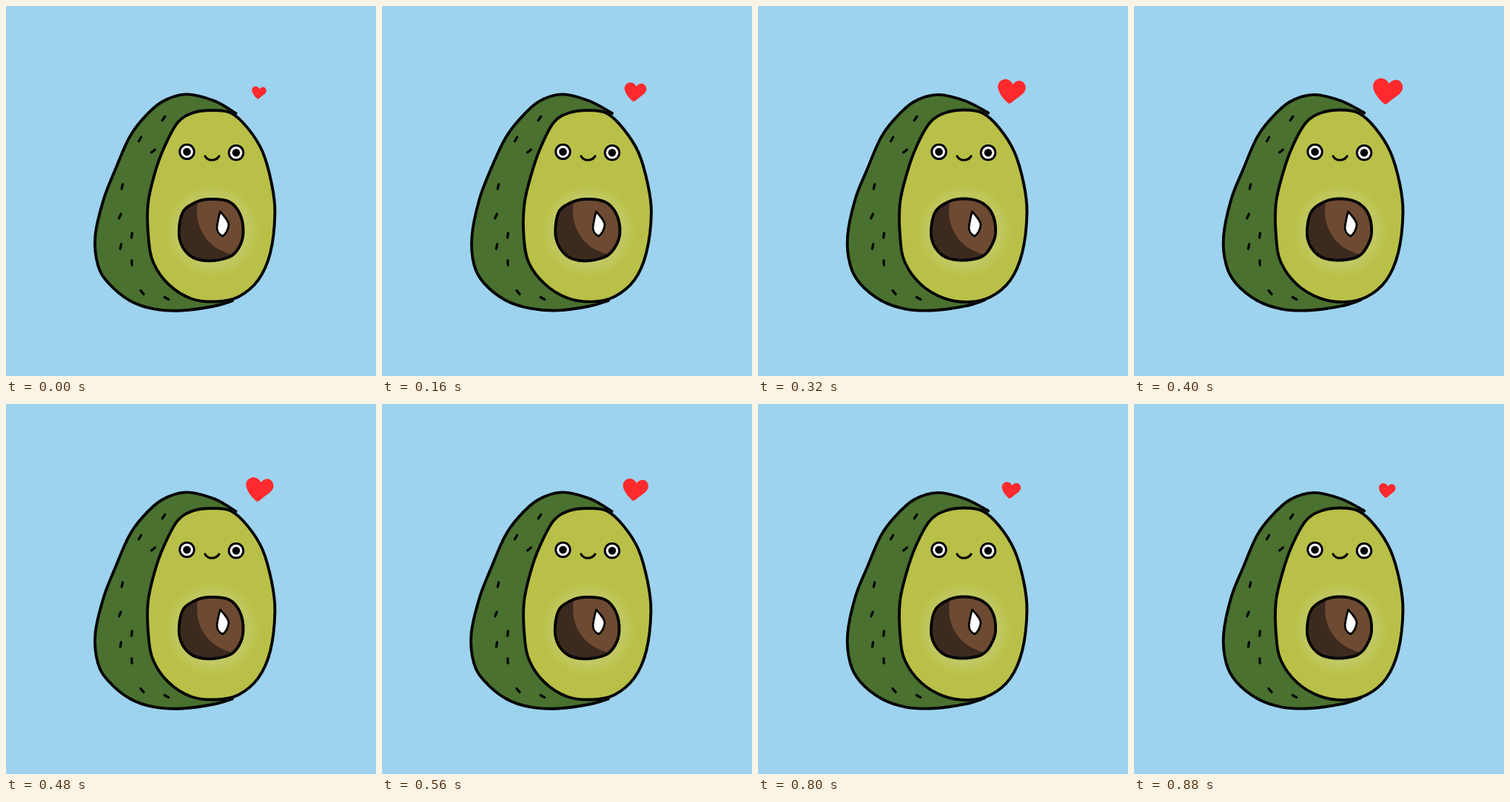
These frames come from a looping animation (500 px wide and 500 px high, 0.96 s). An HTML page with a canvas:

```html
<!DOCTYPE html>
<html lang="en">
<head>
<meta charset="utf-8">
<title>Avocado</title>
<style>
html, body { margin: 0; width: 100%; height: 100%; overflow: hidden; background: #9dd3ee; }
canvas { display: block; width: 500px; height: 500px; }
</style>
</head>
<body>
<canvas id="stage" width="500" height="500"></canvas>
<script>
const ctx = document.getElementById('stage').getContext('2d');
const STEP = 80, STEPS = 12, PEAK = 5, POSES = 3;
const INK = '#050505';

const points = s => s.split(' ').map(p => p.split(',').map(Number));

const skin = points('311,145 281,128 243,120 211,130 185,153 166,179 147,221 132,261 121,311 124,350 138,375 167,398 200,409 238,411 281,406 306,398');
const face = points('279,141 253,144 232,158 214,192 201,228 192,268 192,314 199,347 220,376 250,395 284,400 314,393 341,370 357,333 364,280 359,240 346,197 326,165 304,145');
const pit = points('275,261 254,266 238,281 235,314 249,337 273,344 301,339 315,326 321,306 316,281 301,265');

// Middle and lean in degrees of each skin mark.
const marks = points('213,152,124 181,180,120 199,196,140 157,244,102 154,284,112 170,310,97 155,325,100 170,347,88 184,387,50 217,395,28');

const shade = new Path2D('M261 255C255 279 259 298 269 312C279 326 292 332 306 336L300 350H225V255Z');
const shine = new Path2D('M289.5 278C295 284 301 290 301 296C300 303 297 308 293 311C288 309 285 304 285 299C286 292 287 285 289.5 278Z');
const smile = new Path2D('M269 203C273 210 283 210 288 203');
const heart = new Path2D('M-2 14C-7 10-17 0-18-10C-18-17-13-21-7-21.5C-2-21 2-18 3.5-14C7-18 11-20 15-19C20-18 23-12 22-7C20 0 12 4 7 8C4 10 2 13-2 14Z');

// Repeatable noise in -1..1 redraws the lines a little for each pose.
function noise(seed) {
  const v = Math.sin(seed * 127.1 + 3.7) * 43758.5453;
  return 2 * (v - Math.floor(v)) - 1;
}

function outline(keys, closed, pose) {
  const pts = keys.map(([x, y], i) => {
    const seed = pose * 97 + i * 2;
    return [x + 0.6 * noise(seed), y + 0.6 * noise(seed + 1)];
  });
  const n = pts.length, path = new Path2D();
  const at = i => pts[closed ? (i + n) % n : Math.max(0, Math.min(n - 1, i))];
  path.moveTo(...at(0));
  for (let i = 0; i < (closed ? n : n - 1); i++) {
    const [a, b, c, d] = [at(i - 1), at(i), at(i + 1), at(i + 2)];
    path.bezierCurveTo(
      b[0] + (c[0] - a[0]) / 6, b[1] + (c[1] - a[1]) / 6,
      c[0] - (d[0] - b[0]) / 6, c[1] - (d[1] - b[1]) / 6,
      c[0], c[1]);
  }
  if (closed) path.closePath();
  return path;
}

function fill(path, color) {
  ctx.fillStyle = color;
  ctx.fill(path);
}

function ink(path, width = 3.9) {
  ctx.strokeStyle = INK;
  ctx.lineWidth = width;
  ctx.stroke(path);
}

function disc(x, y, r, color) {
  ctx.fillStyle = color;
  ctx.beginPath();
  ctx.arc(x, y, r, 0, Math.PI * 2);
  ctx.fill();
}

function drawGlow() {
  const g = ctx.createRadialGradient(279, 304, 40, 279, 304, 67);
  g.addColorStop(0, 'rgba(197,205,116,.75)');
  g.addColorStop(0.5, 'rgba(195,203,105,.5)');
  g.addColorStop(1, 'rgba(190,198,80,0)');
  disc(279, 304, 67, g);
}

function drawMarks() {
  const path = new Path2D();
  for (const [x, y, lean] of marks) {
    const a = lean * Math.PI / 180, dx = 3.2 * Math.cos(a), dy = 3.2 * Math.sin(a);
    path.moveTo(x - dx, y - dy);
    path.lineTo(x + dx, y + dy);
  }
  ink(path, 3.3);
}

function drawPit(pose) {
  const shape = outline(pit, true, pose);
  fill(shape, '#6e4a32');
  ctx.save();
  ctx.clip(shape);
  fill(shade, '#3d2a1f');
  ctx.restore();
  ink(shape);
  fill(shine, '#fff');
  ink(shine, 2.8);
}

function drawFace() {
  for (const [x, y] of [[244.5, 197], [311, 198.3]]) {
    disc(x, y, 12.5, 'rgba(202,209,110,.5)');
    disc(x, y, 11.3, INK);
    disc(x, y, 8.3, '#fff');
    disc(x, y, 5.3, INK);
  }
  ink(smile, 3.2);
}

function drawFruit(pose) {
  const back = outline(skin, false, pose), front = outline(face, true, pose);
  fill(back, '#4a712f');
  ink(back);
  fill(front, '#b9c047');
  drawGlow();
  ink(front);
  drawMarks();
  drawPit(pose);
  drawFace();
}

// Swells with a slight ease, then shrinks evenly.
function heartWidth(step) {
  const grown = step <= PEAK
    ? 1 - (1 - step / PEAK) ** 1.3
    : (STEPS - step) / (STEPS - PEAK);
  return 20 + 21 * grown;
}

function drawHeart(width) {
  ctx.save();
  ctx.translate(341, 119);
  ctx.scale(width / 41, width / 41);
  fill(heart, '#ff2a2e');
  ctx.restore();
}

ctx.lineCap = ctx.lineJoin = 'round';
function tick() {
  const step = Math.floor(performance.now() / STEP) % STEPS;
  ctx.fillStyle = '#9dd3ee';
  ctx.fillRect(0, 0, 500, 500);
  drawFruit(Math.floor(step / 2) % POSES);
  drawHeart(heartWidth(step));
  requestAnimationFrame(tick);
}
tick();
</script>
</body>
</html>
```
